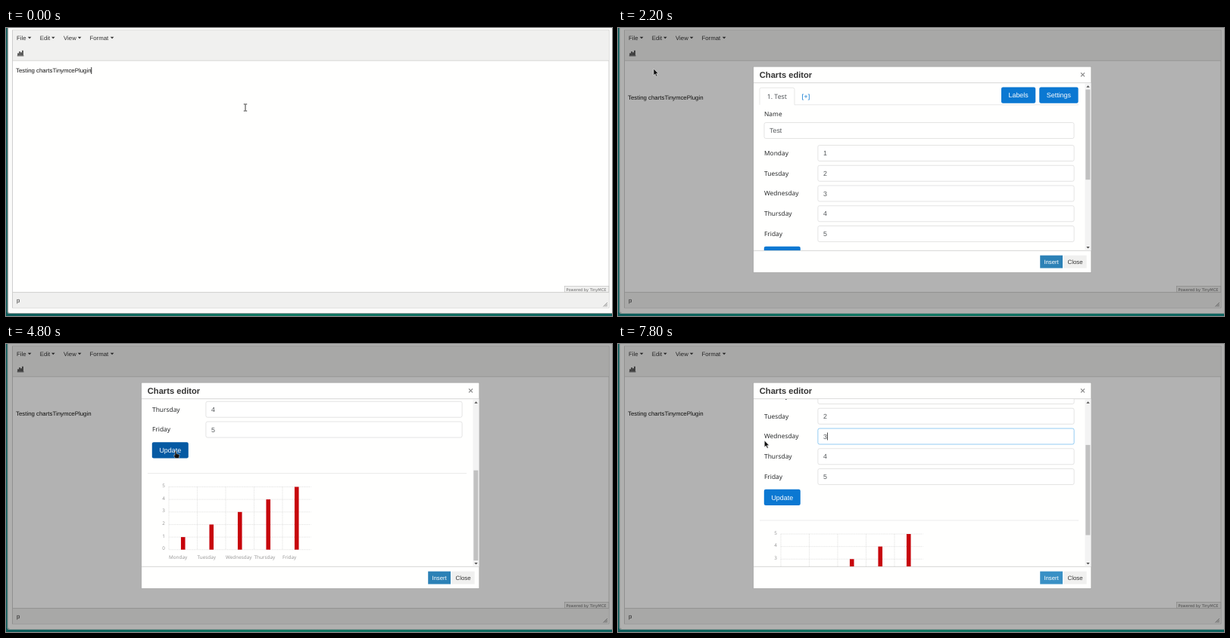
Recreate the animation shown at these times as an HTML page. Size 800x382 px, loop 8 s.

```html
<!DOCTYPE html>
<html lang="en">
<head>
<meta charset="utf-8">
<title>Charts editor</title>
<style>
html, body { margin: 0; width: 100%; height: 100%; overflow: hidden; background: #fff; }
svg { display: block; }
#stage { position: absolute; left: 0; top: 0; }
text { font-family: "Liberation Sans", Arial, sans-serif; text-rendering: geometricPrecision; white-space: pre; }
.noto { font-family: "Noto Sans", sans-serif; }
.tiny { font-family: "DejaVu Sans", sans-serif; }
</style>
</head>
<body>
<svg id="stage" width="800" height="382" viewBox="0 0 800 382"></svg>
<script>
const LOOP = 8000, STEP = 200, MAX_SCROLL = 159.5;
const DAYS = ['Monday', 'Tuesday', 'Wednesday', 'Thursday', 'Friday'];
const ROW = 26.75, ROW_TOP = 155.5, FIELD_H = 21;

const rect = (x, y, w, h, fill, more = '') =>
  `<rect x="${x}" y="${y}" width="${w}" height="${h}" fill="${fill}" ${more}/>`;
const text = (x, y, size, fill, str, more = '') =>
  `<text x="${x}" y="${y}" font-size="${size}" fill="${fill}" ${more}>${str}</text>`;
const path = (d, fill, more = '') => `<path d="${d}" fill="${fill}" ${more}/>`;
const line = (d, stroke, more = '') => path(d, 'none', `stroke="${stroke}" ${more}`);

function editor() {
  const menu = [['File', 14, 28.8], ['Edit', 44.7, 60], ['View', 76, 94.8], ['Format', 110.5, 137.8]];
  const grip = [0, 1, 2].map(i => `M${788.5 + 2 * i} 369.5L793.8 ${364.2 + 2 * i}`).join('');
  return `<defs><linearGradient id="desk">
      <stop offset="0" stop-color="#0d5c5b"/><stop offset=".45" stop-color="#127a63"/>
      <stop offset="1" stop-color="#0f6460"/></linearGradient></defs>` +
    rect(0, 0, 800, 382, 'url(#desk)') +
    path('M1.6 0H800V379H4Q1.6 379 1.6 376.5Z', '#8d9997') +
    path('M3 0H800V378H5Q3 378 3 376Z', '#fbfbfa') +
    rect(8.5, 3, 787.5, 368, '#fffffe', 'stroke="#c3c3c2" stroke-width=".8"') +
    rect(9, 3.4, 786.6, 39.6, '#f0f0ef') +
    line('M9 43.3H796', '#c9c9c8', 'stroke-width=".7"') +
    rect(9, 351, 786.6, 19.7, '#f0f0ef') +
    line('M9 350.6H796', '#c3c3c2', 'stroke-width=".8"') +
    menu.map(([s, x, c]) => text(x, 15.6, 7.8, '#333', s) +
      path(`M${c} 11.8h4.6l-2.3 2.5z`, '#333')).join('') +
    rect(9.5, 25.5, 19, 17, '#dededd', 'id="hover" stroke="#cfcfce" stroke-width=".7"') +
    [[15.4, 2.6], [17.4, 4.8], [19.4, 3.7], [21.3, 6.2]].map(([x, h]) =>
      rect(x, 36 - h, 1.4, h, '#222')).join('') +
    rect(14.8, 36.4, 8.6, .9, '#222') +
    text(13, 59, 7.85, '#111', 'Testing chartsTinymcePlugin', 'id="line"') +
    rect(0, 0, .8, 9, '#000', 'id="caret"') +
    text(14, 364.3, 7.8, '#333', 'p') +
    rect(737.5, 342.5, 58.3, 8.1, '#f0f0ef', 'stroke="#c3c3c2" stroke-width=".7"') +
    text(739.6, 348.6, 5.1, '#666', 'Powered by TinyMCE', 'class="tiny"') +
    line(grip, '#888', 'stroke-width=".9"');
}

function field(x, y, w, value, id) {
  return rect(x + .3, y, w, FIELD_H, '#fff', `id="${id}" rx="2.2" stroke="#d9d9d9" stroke-width=".7"`) +
    text(x + 7.3, y + 13.7, 8.92, '#55595c', value);
}

function button(x, y, w, label, id) {
  return rect(x, y, w, 21.2, '#0b78d2', `id="${id}" rx="2.2"`) +
    text(x + w / 2, y + 13.7, 8.92, '#fff', label, 'text-anchor="middle"');
}

function chart() {
  const left = 215, top = 349, gx = 37.5, gy = 16.65, base = top + 5 * gy;
  let grid = '', out = '';
  for (let i = 0; i < 6; i++) {
    grid += `M${left} ${base - i * gy}h${5 * gx}`;
    out += text(210, base - i * gy + .5, 6.35, '#999', i, 'class="noto" text-anchor="end"');
  }
  DAYS.forEach((day, i) => {
    const x = left + i * gx;
    grid += `M${x} ${top}V${base}`;
    out += rect(x + gx / 2 - 2.8, base - (i + 1) * gy, 5.6, (i + 1) * gy, '#c7040b') +
      text(x, base + 11.8, 6.35, '#999', day, 'class="noto"');
  });
  return line(grid, '#ccc', 'stroke-width=".6" stroke-dasharray="1.1"') + out;
}

function form() {
  return line('M187 101.8V81.5Q187 79.3 189.2 79.3H230.8Q233 79.3 233 81.5V101.8H608', '#ddd', 'stroke-width=".7"') +
    text(196.7, 93.5, 8.8, '#55595c', '1. Test', 'class="noto"') +
    text(242.5, 93.5, 8.9, '#0b78d2', '[+]', 'class="noto"') +
    button(506, 78.6, 45.2, 'Labels', 'labels') + button(556.2, 78.6, 51.4, 'Settings', 'settings') +
    text(193, 117.2, 8.4, '#292b2c', 'Name', 'class="noto"') +
    field(192.7, 125.5, 409, 'Test', 'name') +
    DAYS.map((day, i) => text(193, ROW_TOP + i * ROW + 13.4, 8.4, '#292b2c', day, 'class="noto"') +
      field(263.6, ROW_TOP + i * ROW, 338.2, i + 1, 'day' + i)).join('') +
    rect(276.2, ROW_TOP + 2 * ROW + 5.5, .8, 10, '#222', 'id="fieldCaret"') +
    button(192.8, 289.8, 48, 'Update', 'update') +
    line('M187 331H608', '#e3e3e3', 'stroke-width=".7"') + chart();
}

function dialog() {
  return `<g id="dialog">` + rect(3, 0, 797, 378, '#000', 'opacity=".3"') +
    rect(178.8, 51.2, 446, 273, '#fffffe', 'stroke="#999" stroke-width=".5"') +
    text(186.8, 66, 11.15, '#333', 'Charts editor', 'font-weight="bold"') +
    line('M611 59.4l5 5m0-5l-5 5', '#888', 'stroke-width="1.2"') +
    line('M179 72.7H624.6M179 295.3H624.6', '#c5c5c5', 'stroke-width=".7"') +
    `<svg x="179" y="73" width="437" height="222" viewBox="179 73 437 222"><g id="form">${form()}</g></svg>` +
    rect(616.4, 73.1, 8, 221.9, '#f3f3f3') +
    path('M618.3 78.8h4.4l-2.2-2.5zM618.3 290h4.4l-2.2 2.5z', '#505050') +
    rect(617.3, 81.6, 6, 119.6, '#c1c1c1', 'id="thumb"') +
    rect(557.2, 301.6, 29.8, 16.9, '#2c81b6', 'id="insert"') +
    text(572, 312.8, 7.8, '#fff', 'Insert', 'text-anchor="middle"') +
    rect(588.6, 301.6, 30, 16.9, '#f0f0ef') +
    text(603.5, 312.8, 7.8, '#333', 'Close', 'text-anchor="middle"') + `</g>`;
}

const pointers =
  path('M0 0V8.8L2 7 3.6 10.3 5 9.7 3.5 6.4H6.2Z', '#111', 'id="arrow" stroke="#fff" stroke-width=".5"') +
  line('M-2.2-4.5H-.6L0-4 .6-4.5H2.2M0-4V4M-2.2 4.5H-.6L0 4 .6 4.5H2.2', '#222', 'id="beam" stroke-width=".9"') +
  path('M-1 1Q0-.6 .9 1V4L4 4.7Q5.2 5 5 6.4L4.2 10H-.6L-2.6 6.5Q-2.6 5.2-1 6Z', '#111',
    'id="hand" stroke="#fff" stroke-width=".4"');

document.getElementById('stage').innerHTML = editor() + dialog() + pointers;
const $ = id => document.getElementById(id);
const set = (id, attrs) => { for (const k in attrs) $(id).setAttribute(k, attrs[k]); };
const show = (id, on) => set(id, { visibility: on ? 'visible' : 'hidden' });

// [time, x, y]
const MOUSE = [
  [0, 316, 105.5], [1000, 316, 105.5], [1600, 15.5, 33], [2000, 15.5, 33], [2200, 47, 54],
  [3000, 620, 192], [3600, 632.5, 281], [3800, 632.5, 288], [4000, 632.5, 288], [4800, 224, 141.5],
  [5200, 224, 141.5], [5800, 614, 227], [6400, 612, 193], [7600, 284, 122.5], [7800, 193.3, 128]
];
const SCROLL = [[0, 0], [3000, 0], [3600, MAX_SCROLL], [5800, MAX_SCROLL], [6400, 97]];

function mix(keys, t) {
  const i = keys.findIndex(k => k[0] > t);
  if (i < 0) return keys[keys.length - 1].slice(1);
  const a = keys[i - 1], b = keys[i], p = (t - a[0]) / (b[0] - a[0]);
  return a.slice(1).map((v, n) => v + (b[n + 1] - v) * p);
}

function pointerKind(t, x, y, scroll) {
  if (t < 2200) return y > 44 ? 'beam' : 'arrow';
  if (t >= 4800 && t < 5400) return 'hand';
  const row = (y + scroll - ROW_TOP) / ROW;
  const inField = x > 264 && x < 602 && row >= 0 && row < 5 && row % 1 < FIELD_H / ROW;
  return inField ? 'beam' : 'arrow';
}

function draw(now) {
  const t = Math.floor(now % LOOP / STEP) * STEP;
  const [x, y] = mix(MOUSE, t), [scroll] = mix(SCROLL, t);
  const kind = pointerKind(t, x, y, scroll);
  for (const id of ['arrow', 'beam', 'hand']) show(id, id === kind);
  set(kind, { transform: `translate(${x} ${y})` });

  const drop = t < 800 ? 0 : t < 1000 ? 18 : 36;
  set('line', { y: 59 + drop });
  set('caret', { x: t < 600 ? 112.4 : 13, y: 52 + (t < 1200 ? drop : 0) });
  show('caret', t < 2000);
  show('hover', t >= 1600 && t < 2200);

  set('dialog', { display: t < 2200 ? 'none' : 'inline' });
  set('form', { transform: `translate(0 ${-scroll})` });
  const dragging = t >= 3000 && t < 4200 || t >= 5800 && t < 6600;
  set('thumb', { y: 81.6 + scroll * .539, fill: dragging ? '#787878' : '#c1c1c1' });
  set('update', { fill: kind === 'hand' ? '#065aa3' : '#0b78d2' });

  const focused = t >= 7600;
  set('day2', { stroke: t >= 7800 ? '#66b7ec' : focused ? '#9fc8e3' : '#d9d9d9' });
  $('fieldCaret').style.display = focused ? '' : 'none';
  set('insert', { fill: focused ? '#3990c5' : '#2c81b6' });
}

const start = performance.now();
function tick() {
  draw(performance.now() - start);
  requestAnimationFrame(tick);
}
tick();
</script>
</body>
</html>
```
